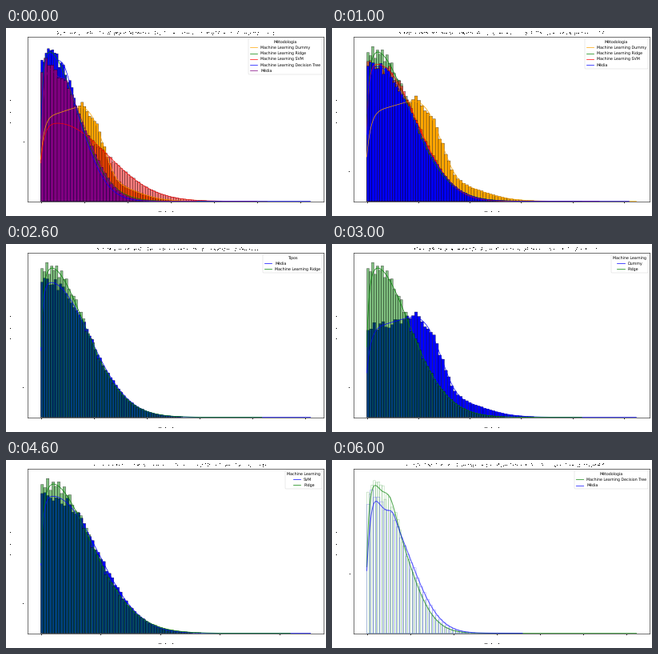
These frames come from a looping animation (400 px wide and 235 px high, 7 s). A matplotlib script:

```python
import numpy as np
import matplotlib.pyplot as plt
from matplotlib.animation import FuncAnimation
from matplotlib.lines import Line2D

W, H = 400, 235
LEFT, RIGHT, TOP, BASE = 27, 397, 11, 216.5
X0 = 43.5  # stage x of data value zero

plt.rcParams.update({
    "font.family": "DejaVu Sans", "text.hinting": "none",
    "patch.linewidth": 0.34, "axes.linewidth": 0.4,
})


class Series:
    """Histogram with a density curve; x in tick units, height in pixels.

    Each bump is (height, centre, spread, power) of a generalised bell.
    """

    def __init__(self, bin_width, end, bumps, rise=0.04, noise=0.04, seed=1):
        self.width = bin_width
        self.x = np.linspace(0, end, 600)
        ramp = 1 - 0.5 * np.exp(-self.x / rise)
        self.curve = self.shape(self.x, bumps) * ramp

        left = np.arange(0, end, bin_width)
        jitter = np.random.default_rng(seed).uniform(-noise, noise, len(left))
        heights = self.shape(left + bin_width / 2, bumps) * (1 + jitter)
        self.left, self.heights = left[heights > 0.6], heights[heights > 0.6]

    @staticmethod
    def shape(x, bumps):
        return sum(h * np.exp(-(np.abs(x - c) / s) ** p) for h, c, s, p in bumps)

    def bars(self, unit, scale, **style):
        ax.bar(X0 + self.left * unit, -self.heights * scale, self.width * unit,
               bottom=BASE, align="edge", snap=False, **style)

    def line(self, unit, scale, **style):
        ax.plot(X0 + self.x * unit, BASE - self.curve * scale, **style)


SERIES = {
    "dummy": Series(0.058, 5.24, [(112, 0.45, 1.05, 4.5), (24, 1.5, 0.9, 2)],
                    rise=0.08, noise=0.06, seed=2),
    "ridge": Series(0.0463, 4.18, [(187, 0.2, 0.94, 1.8)], noise=0.05, seed=4),
    "svm": Series(0.047, 4.52, [(172, 0.15, 1.08, 2.2)], seed=5),
    "svm wide": Series(0.059, 5, [(98, 0.3, 1.67, 2.18)], rise=0.08,
                       noise=0.03, seed=6),
    "mean": Series(0.05, 5.1, [(186, 0.15, 1.064, 2.06)], seed=7),
    "mean coarse": Series(0.076, 3.6, [(155, 0.3, 0.974, 2.1), (22, 0.12, 0.18, 2),
                                       (8, 0.6, 0.12, 2)], rise=0.08, seed=8),
    "tree": Series(0.05, 6.24, [(175, 0.25, 0.887, 2), (12, 0.15, 0.15, 2),
                                (12, 0.55, 0.17, 2)], noise=0.05, seed=9),
}

ML = "Machine Learning "
# Each layer: series, legend label, colour, bar opacity, vertical scale.
SCENES = [
    dict(unit=54, title=(56, 337), yticks=[(22, 142)], legend="Métodologia", layers=[
        ("dummy", ML + "Dummy", "orange", 1, 0.94),
        ("ridge", ML + "Ridge", "green", 0, 1),
        ("svm wide", ML + "SVM", "red", 0.5, 1),
        ("tree", ML + "Decision Tree", "blue", 1, 1),
        ("mean coarse", "Média", "purple", 1, 1)]),
    dict(unit=64.3, title=(80, 343), yticks=[(21, 179)], legend="Métodologia", layers=[
        ("dummy", ML + "Dummy", "orange", 1, 1),
        ("ridge", ML + "Ridge", "green", 0.5, 1),
        ("svm", ML + "SVM", "red", 0.5, 1),
        ("mean", "Média", "blue", 1, 0.91)]),
    dict(unit=66.1, title=(110, 316), yticks=[(21, 179)], legend="Tipos", layers=[
        ("mean", "Média", "blue", 1, 0.91),
        ("ridge", ML + "Ridge", "green", 0.5, 1)]),
    dict(unit=64.3, title=(101, 332), yticks=[(21, 179)], legend=ML.strip(), layers=[
        ("dummy", "Dummy", "blue", 1, 1),
        ("ridge", "Ridge", "green", 0.5, 1)]),
    dict(unit=74.6, title=(110, 327), yticks=[(21, 179)], legend=ML.strip(), layers=[
        ("svm", "SVM", "blue", 1, 1),
        ("ridge", "Ridge", "green", 0.5, 1)]),
    dict(unit=66.1, title=(110, 316), yticks=[(22, 134), (21, 176)], legend="Tipos",
         layers=[
        ("mean", "Média", "blue", 1, 1),
        ("svm", ML + "SVM", "green", 0.5, 1.1)]),
    dict(unit=54, title=(91, 340), yticks=[(22, 142)], legend="Métodologia",
         outline=True, layers=[
        ("tree", ML + "Decision Tree", "green", 0.5, 1),
        ("mean coarse", "Média", "blue", 0.5, 1)]),
]
AXIS_SPECKS = [(5, 90), (5, 105), (5, 118), (191, 229), (193, 229), (199, 229), (208, 229)]

fig = plt.figure(figsize=(W / 100, H / 100), dpi=100, facecolor="white")
ax = fig.add_axes([LEFT / W, 1 - BASE / H, (RIGHT - LEFT) / W, (BASE - TOP) / H])


def title_specks(span):
    """Sparse remains of a tiny title line."""
    rng = np.random.default_rng(sum(span))
    chances = {4: 0.03, 5: 0.06, 6: 0.14, 7: 0.03, 8: 0.03}
    return [(x, y) for y, chance in chances.items()
            for x in range(*span) if rng.random() < chance]


def draw_specks(scene):
    ticks = [(round(x), 218) for x in np.arange(X0, 381, scene["unit"])]
    x, y = np.array(title_specks(scene["title"]) + scene["yticks"] + ticks + AXIS_SPECKS).T
    ax.scatter(x, y, s=0.72 ** 2, marker="s", c="black", linewidths=0, clip_on=False)


def draw(i):
    scene = SCENES[i]
    unit, outline = scene["unit"], scene.get("outline", False)
    stroke = dict(lw=0.75, alpha=0.65) if outline else dict(lw=0.5)
    ax.clear()
    ax.set(xlim=(LEFT, RIGHT), ylim=(BASE, TOP), xticks=[], yticks=[])
    handles = []
    for name, label, color, alpha, scale in scene["layers"]:
        series = SERIES[name]
        if outline:
            series.bars(unit, scale, fill=False, edgecolor=color, alpha=0.45,
                        linewidth=0.3)
        elif alpha:
            series.bars(unit, scale, facecolor=(color, alpha), edgecolor="black",
                        linewidth=0.22)
        series.line(unit, scale, color=color, **stroke)
        handles.append(Line2D([], [], color=color, label=label, **stroke))
    draw_specks(scene)
    ax.legend(handles=handles, title=scene["legend"], loc="upper right",
              fontsize=3.41, title_fontsize=3.41, borderaxespad=0.4)
    return []


anim = FuncAnimation(fig, draw, frames=len(SCENES), interval=1000, repeat=True,
                     repeat_delay=0, blit=False)
plt.show()
```
